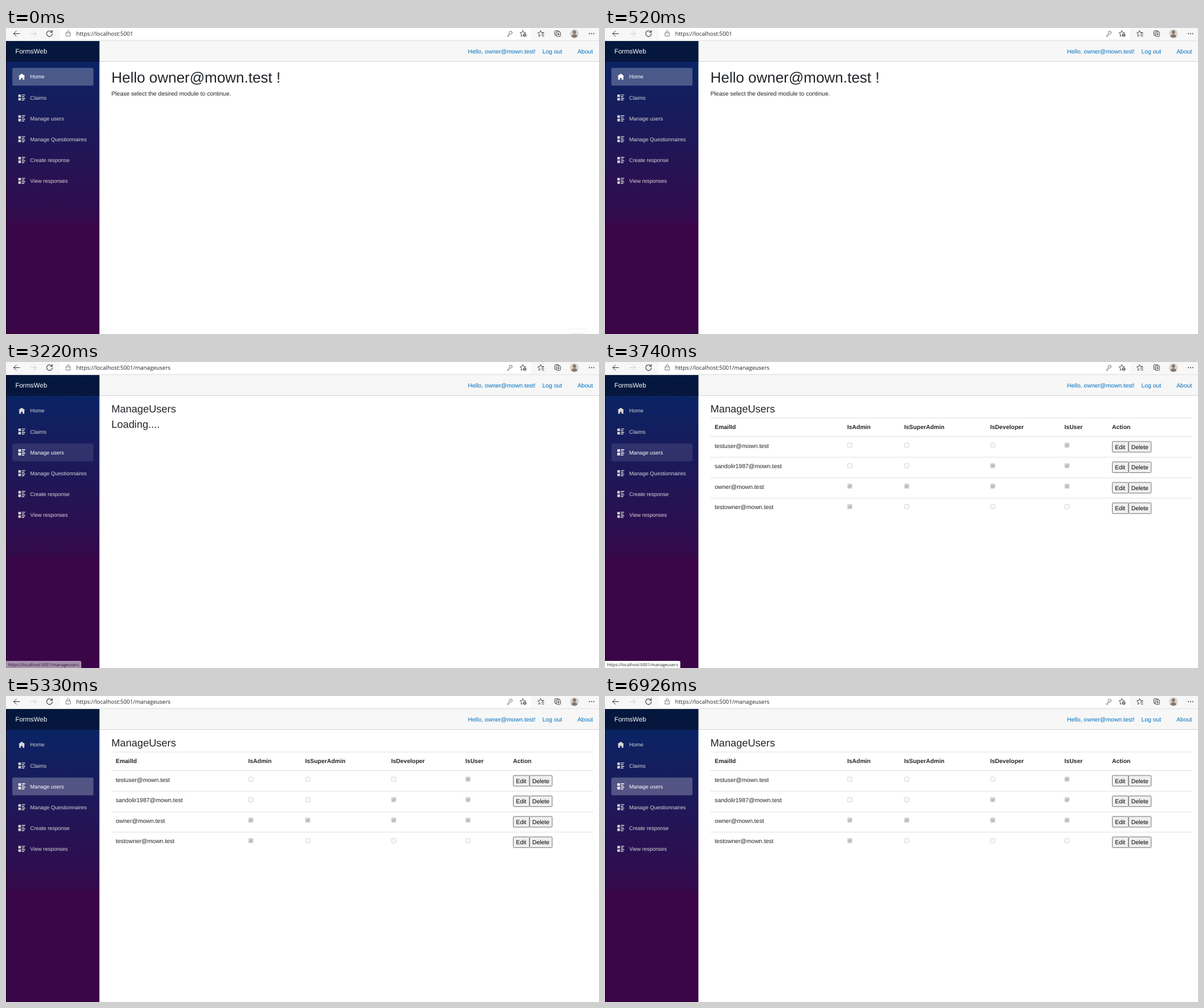
An HTML page that plays this animation: 1000x516 px, repeating every 7990 ms.

```html
<!DOCTYPE html>
<html lang="en">
<head>
<meta charset="utf-8">
<title>FormsWeb</title>
<style>
html, body { margin: 0; height: 100%; overflow: hidden; background: #fff; }
svg { display: block; width: 100vw; height: 100vh; }
text { font: 10px "Liberation Sans", Arial, sans-serif; fill: #212529; text-rendering: geometricPrecision; white-space: pre; }
.ui { font-family: "Open Sans", sans-serif; }
.link { fill: #0071c1; }
.icon { fill: none; stroke: #333; stroke-linecap: round; stroke-linejoin: round; }
</style>
</head>
<body>
<svg id="stage" viewBox="0 0 1000 516">
  <defs>
    <linearGradient id="side" x1="0" y1="0" x2="0" y2="1">
      <stop stop-color="#052767"/><stop offset="1" stop-color="#340a4b"/>
    </linearGradient>
  </defs>

  <!-- browser bar -->
  <path fill="#f7f7f7" d="M0 0H1000V56H0z"/>
  <path fill="#fff" d="M91 0H885V16a3 3 0 0 1-3 3H94a3 3 0 0 1-3-3z"/>
  <path fill="#e2e2e2" d="M0 21H1000V22H0z"/>
  <g class="icon">
    <path d="M23 9.5H13M17.5 5L13 9.500L17.500 14"/>
    <path stroke="#ccc" d="M42 9.500H51M47 5L51.500 9.500L47 14"/>
    <path stroke-width="1.100" d="M77.500 7A4.800 4.800 0 1 0 78.200 9.500M78 4V7.300H74.700"/>
    <g stroke="#666" stroke-width=".8">
      <path d="M101.500 8H108.500V13.500H101.500zM103 8V6.500a2 2 0 0 1 4 0V8M105 10.500v.4"/>
      <circle cx="851" cy="7.800" r="2.600"/><path d="M849.200 9.700L845.500 13.200V14.200H847.500V13L849.500 11.500M851.800 7h.1"/>
    </g>
    <path id="star" stroke-width=".9" d="M871.500 4.500L873 7.600L876.500 8M871.500 4.500L870 7.600L866.800 8.100L869.200 10.500L868.700 14L871 12.800"/>
    <circle cx="874.800" cy="12" r="2.800" fill="#555" stroke="none"/>
    <path stroke="#fff" stroke-width=".7" d="M873.500 12h2.600M874.800 10.700v2.600"/>
    <use href="#star" x="30"/>
    <path stroke-width=".9" d="M904 8H907M903 10.800H907M904 13.500H907"/>
    <path stroke-width=".9" d="M928 12.500H926.500a1 1 0 0 1-1-1V5.500a1 1 0 0 1 1-1H931.500a1 1 0 0 1 1 1V6M929 6.500H934a1 1 0 0 1 1 1V13a1 1 0 0 1-1 1H929a1 1 0 0 1-1-1V7.500a1 1 0 0 1 1-1M931.500 8.500V12M929.800 10.200H933.200"/>
  </g>
  <circle cx="958.500" cy="9.500" r="7.300" fill="#d8d4d0"/>
  <path fill="#8a7768" d="M958.500 4a2.900 2.900 0 0 1 0 5.800a2.900 2.900 0 0 1 0-5.800M953.500 14.500a5 4 0 0 1 10 0a7.300 7.300 0 0 1-10 0"/>
  <g fill="#333"><circle cx="983.800" cy="9.500" r=".9"/><circle cx="987.500" cy="9.500" r=".9"/><circle cx="991.200" cy="9.500" r=".9"/></g>

  <!-- page frame -->
  <path fill="#d6d5d5" d="M157 56H1000V57H157z"/>
  <path fill="url(#side)" d="M0 22H157.500V328H0z"/>
  <path fill="#3a0647" d="M0 328H157.500V516H0z"/>
  <path fill="#000" fill-opacity=".4" d="M0 22H157.500V57H0z"/>
  <path fill="#15051f" d="M0 22H1V516H0z"/>
</svg>
<script>
const LOOP = 7990, OPEN = 3220, LOADED = 3740, DONE = 5330;
const stage = document.getElementById('stage');
const owner = 'owner@mown.test';

function add(tag, attrs, parent = stage) {
  const el = document.createElementNS('http://www.w3.org/2000/svg', tag);
  for (const key in attrs) el.setAttribute(key, attrs[key]);
  return parent.appendChild(el);
}

function label(x, y, str, { size = 10, parent = stage, ...attrs } = {}) {
  const el = add('text', { x, y, style: `font-size:${size}px`, ...attrs }, parent);
  el.textContent = str;
  return el;
}

// header
const url = label(118.5, 12.7, '', { size: 9.45, class: 'ui', fill: '#444' });
label(15.7, 43, 'FormsWeb', { size: 11, style: 'font-size:11px;fill:#fff' });
label(779, 42.7, `Hello, ${owner}!`, { class: 'link' });
label(904.5, 42.7, 'Log out', { class: 'link' });
label(963.7, 42.7, 'About', { class: 'link' });

// sidebar menu
const house = 'M4 0l-4 3h1v4h2v-2h2v2h2v-4h1z';
const list = 'M0 0h3v3h-3zM4 0h4v1h-4zM4 2h3v1h-3zM0 4h3v3h-3zM4 4h4v1h-4zM4 6h3v1h-3z';
const menu = ['Home', 'Claims', 'Manage users', 'Manage Questionnaires', 'Create response', 'View responses']
  .map((name, i) => {
    const mid = 82.2 + i * 35.13;
    const box = add('rect', { x: 10.7, y: mid - 15, width: 136.8, height: 30, rx: 2.5, fill: '#fff' });
    const icon = add('path', { d: i ? list : house, transform: `translate(20.8 ${mid - 5.2}) scale(1.45)` });
    return { box, icon, text: label(40.8, mid + 3.2, name, { size: 9 }) };
  });

function shade(i, opacity) {
  const { box, icon, text } = menu[i];
  box.style.fillOpacity = opacity;
  icon.style.fill = text.style.fill = opacity ? '#fff' : '#d7d7d7';
}

// home page
const home = add('g');
label(177.7, 92, `Hello ${owner} !`, { size: 25, parent: home });
label(177.7, 114.3, 'Please select the desired module to continue.', { parent: home });

// users page
const users = add('g');
label(177.7, 84.6, 'ManageUsers', { size: 17.5, parent: users });
const loading = label(177.7, 110.6, 'Loading....', { size: 17.5 });

const table = add('g');
const line = (y, h) => add('rect', { x: 178, y, width: 812, height: h, fill: '#dee2e6' }, table);
const columns = [409, 505, 650, 775.3];
line(94, 1);
line(125, 1.2);
['EmailId', 'IsAdmin', 'IsSuperAdmin', 'IsDeveloper', 'IsUser', 'Action'].forEach((name, i) =>
  label([185, ...columns, 855][i] - (i % 5 ? .5 : 0), 113.2, name,
    { parent: table, style: 'font-size:10px;font-weight:bold' }));

function button(x, y, width, name) {
  add('rect', { x: x + .5, y: y + .5, width: width - 1, height: 18, rx: 1.2, fill: '#efefef', stroke: '#767676' }, table);
  label(x + 5, y + 13, name, { parent: table, style: 'font-size:10px;fill:#000' });
}

function checkbox(x, y, on) {
  add('rect', { x: x + .4, y: y + .4, width: 7.4, height: 7.4, rx: 1.2,
    fill: on ? '#d0d0d0' : '#fafafa', stroke: '#cbcbcb', 'stroke-width': .8 }, table);
  if (on) add('path', { d: `M${x + 1.9} ${y + 4.2}l1.6 1.7l3 -3.6`, fill: 'none', stroke: '#8a8a8a' }, table);
}

[
  ['testuser@mown.test', '0001'],
  ['sandolir1987@mown.test', '0011'],
  [owner, '1111'],
  ['testowner@mown.test', '1000']
].forEach(([mail, flags], i) => {
  const y = 126 + i * 34.55;
  if (i) line(Math.round(y - .5), 1);
  label(185, y + 18.5, mail, { parent: table });
  columns.forEach((x, c) => checkbox(x - .3, y + 10.2, flags[c] === '1'));
  button(855, y + 7.5, 28, 'Edit');
  button(882.5, y + 7.5, 39, 'Delete');
});

// link preview in the lower left corner
const status = add('g');
add('path', { d: 'M0 504H124.500a2.500 2.500 0 0 1 2.500 2.500V516H0z', fill: '#fff' }, status);
const link = 'https://localhost:5001';
label(3.7, 513, link + '/manageusers', { size: 7.1, parent: status, class: 'ui' });

// fading button in the lower right corner
const record = add('g');
add('rect', { x: 948.5, y: 506.5, width: 30, height: 14, fill: 'none', stroke: '#f3f3f3' }, record);
label(952, 517.5, 'Record', { parent: record, class: 'ui', style: 'font-size:6.8px;fill:#d8d8d8' });

const show = (el, on) => el.style.display = on ? '' : 'none';

function draw(now) {
  const t = now % LOOP, opened = t >= OPEN, loaded = t >= LOADED;
  url.textContent = link + (opened ? '/manageusers' : '');
  menu.forEach((_, i) => shade(i, 0));
  if (!opened) shade(0, .25);
  else shade(2, t < DONE ? .1 : .25);
  show(home, !opened);
  show(users, opened);
  show(loading, opened && !loaded);
  show(table, loaded);
  show(status, opened && t < DONE);
  status.style.opacity = loaded ? 1 : .55;
  show(record, t < 520);
  requestAnimationFrame(draw);
}
requestAnimationFrame(draw);
</script>
</body>
</html>
```
